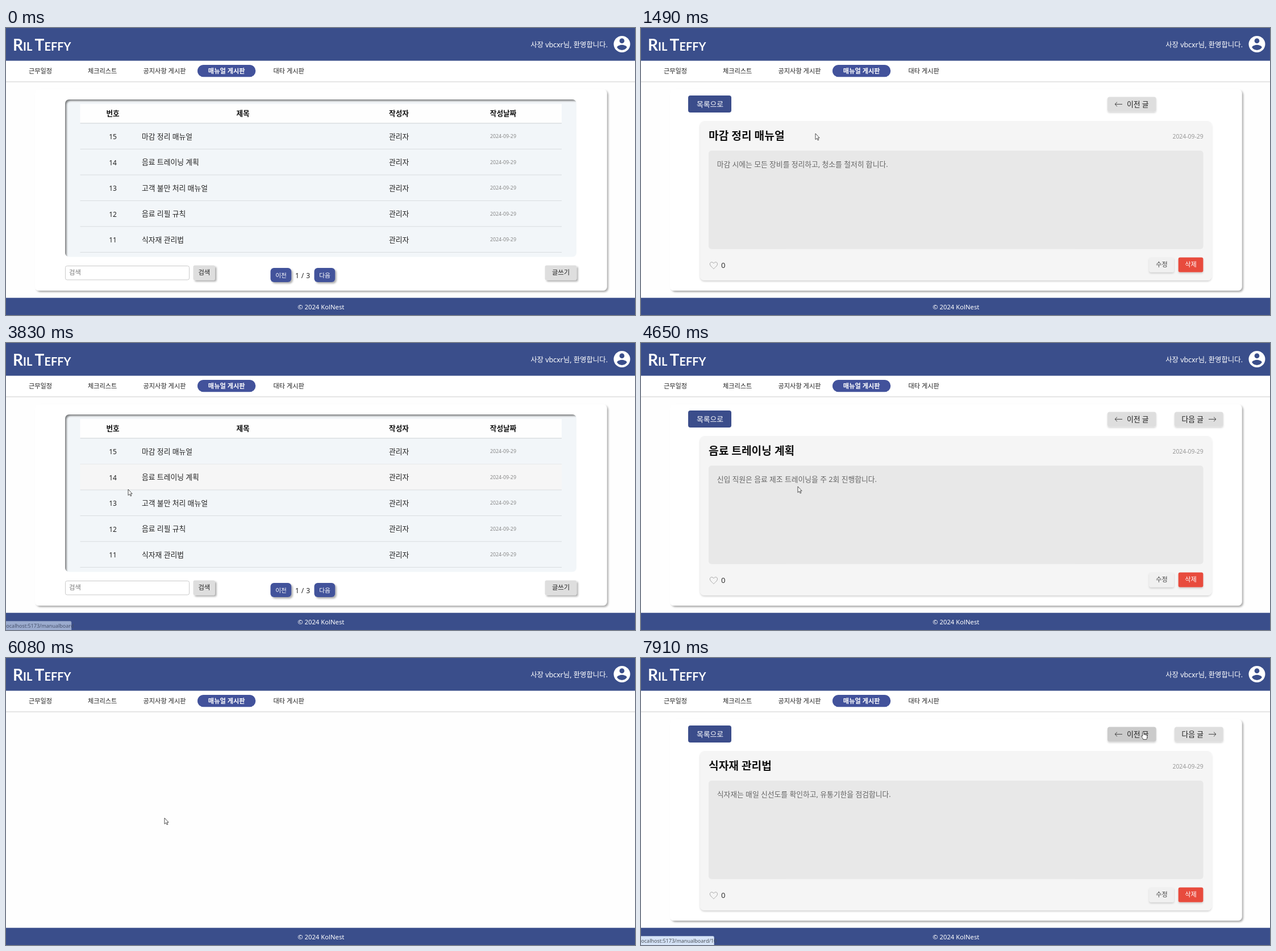
Write an HTML page that moves like this. It is 1107 by 506 pixels and loops after 8000 ms.

```html
<!DOCTYPE html>
<html lang="ko">
<head>
<meta charset="utf-8">
<title>Manual board</title>
<style>
html, body { margin: 0; width: 100%; height: 100%; overflow: hidden; background: #fefefe; }
svg { display: block; width: 1107px; height: 506px; }
text { font-family: "Noto Sans", "Noto Sans CJK KR", "Noto Sans CJK JP", sans-serif; white-space: pre; }
.logo { font-family: Lato, "Open Sans", sans-serif; font-weight: 700; }
</style>
</head>
<body>
<svg id="stage" viewBox="0 0 1107 506" xmlns="http://www.w3.org/2000/svg">
  <defs>
    <filter id="drop" x="-20%" y="-30%" width="150%" height="180%">
      <feDropShadow dx="2.5" dy="2.5" stdDeviation="1.7" flood-opacity=".32"/>
    </filter>
    <filter id="low" x="-20%" y="-30%" width="150%" height="180%">
      <feDropShadow dx="0" dy="2" stdDeviation="1.6" flood-opacity=".17"/>
    </filter>
    <filter id="blur"><feGaussianBlur stdDeviation="1.7"/></filter>
    <clipPath id="panelClip"><rect x="104" y="126" width="900" height="277.5" rx="7"/></clipPath>
  </defs>
  <rect width="1107" height="506" fill="#fefefe"/>
  <g id="frame"></g>
  <g id="page">
    <rect x="51" y="108" width="1006.5" height="355" rx="7" fill="#fff" filter="url(#drop)"/>
    <g id="list"></g>
    <g id="detail"></g>
  </g>
  <g id="status">
    <path id="tab" fill="#d5e3f7" stroke="#b4c4dc" stroke-width=".6"/>
    <text id="url" x="-2" y="501.5" font-size="9" fill="#4a5058"></text>
  </g>
  <circle id="ring" r="8.3" fill="#b5ad18" opacity=".85"/>
  <g id="cursor">
    <path id="arrow" d="M0 0V10.6L2.5 8.4L4.2 12L5.8 11.3L4.2 7.8H7.2Z" fill="#fff" stroke="#222" stroke-width=".8" stroke-linejoin="round"/>
    <path id="hand" d="M-1.2 1.1C-1.2-.4 1.1-.4 1.1 1.1V5.2C1.7 4.4 3 4.6 3.1 5.5C3.8 4.8 5 5.2 5 6C5.8 5.5 6.8 6 6.8 7V9.8C6.8 11.3 6 12 5.8 13.6H-.2C-.6 11.6-2.6 9.8-3.4 8C-3.7 7-2.3 6.6-1.2 8Z" fill="#fff" stroke="#222" stroke-width=".8" stroke-linejoin="round"/>
  </g>
</svg>
<script>
const $ = id => document.getElementById(id);
const LOOP = 8000, NAVY = '#3a4e8b', BLUE = '#42529b', GREY = '#dedede';

const attrs = o => Object.entries(o).map(([k, v]) => ` ${k}="${v}"`).join('');
const box = (x, y, w, h, rx, fill, more = {}) =>
  `<rect${attrs({ x, y, width: w, height: h, rx, fill, ...more })}/>`;
const text = (s, x, y, size, fill, more = {}) =>
  `<text${attrs({ x, y, 'font-size': size, fill, ...more })}>${s}</text>`;
const mid = { 'text-anchor': 'middle' }, end = { 'text-anchor': 'end' };
const bold = { 'font-weight': 700 };
const drop = { filter: 'url(#drop)' }, low = { filter: 'url(#low)' };
const show = (el, on) => el.setAttribute('visibility', on ? 'inherit' : 'hidden');

const posts = {
  15: ['마감 정리 매뉴얼', '마감 시에는 모든 장비를 정리하고, 청소를 철저히 합니다.'],
  14: ['음료 트레이닝 계획', '신입 직원은 음료 제조 트레이닝을 주 2회 진행합니다.'],
  13: ['고객 불만 처리 매뉴얼', '고객 불만이 있을 경우 매니저에게 즉시 보고합니다.'],
  12: ['음료 리필 규칙', '음료 리필은 1회에 한해 무료로 제공합니다.'],
  11: ['식자재 관리법', '식자재는 매일 신선도를 확인하고, 유통기한을 점검합니다.']
};
const DATE = '2024-09-29', ROW = 45.5, TOP = 168;

function buildFrame() {
  const tabs = ['근무일정', '체크리스트', '공지사항 게시판', '매뉴얼 게시판', '대타 게시판'];
  const xs = [60.5, 169.7, 279, 388.2, 497.6];
  $('frame').innerHTML =
    box(0, 94, 1107, 1.2, 0, '#dcdcdc') + box(0, 95.2, 1107, 1.3, 0, '#f3f3f3') +
    box(0, 58, 1107, 36, 0, '#fff') + box(0, 0, 1107, 57.7, 0, NAVY) +
    `<text class="logo" x="12" y="40" fill="#fff" font-size="28">R<tspan font-size="20">IL </tspan>T<tspan font-size="20">EFFY</tspan></text>` +
    text('사장 vbcxr님, 환영합니다.', 1059, 33.5, 12.4, '#fff', { ...end, 'font-weight': 500 }) +
    `<g transform="translate(1066.6 11.1) scale(1.45)"><circle cx="12" cy="12" r="10" fill="#fff"/>
     <circle cx="12" cy="8" r="3" fill="${NAVY}"/>
     <path fill="${NAVY}" d="M12 19.2c-2.5 0-4.71-1.28-6-3.22.03-1.99 4-3.08 6-3.08s5.97 1.09 6 3.08c-1.29 1.94-3.5 3.22-6 3.22z"/></g>` +
    box(337, 65, 102.3, 21.3, 10.6, BLUE) +
    tabs.map((s, i) => text(s, xs[i], 79.6, 11.2, i == 3 ? '#fff' : '#222',
      i == 3 ? { ...mid, ...bold } : mid)).join('') +
    box(0, 475.7, 1107, 30.3, 0, NAVY) +
    text('© 2024 KolNest', 554.3, 496.3, 11.3, '#fff', { ...mid, 'font-weight': 500 });
}

function buildList() {
  const head = [['번호', 188], ['제목', 417], ['작성자', 691.5], ['작성날짜', 875]];
  const rows = [15, 14, 13, 12, 11].map((id, i) => {
    const y = TOP + ROW * i;
    return `<rect id="row${id}" x="130.5" y="${y}" width="847.5" height="${ROW}" fill="#f6f6f6"/>` +
      box(130.5, y + ROW - .5, 847.5, 1, 0, '#d9dde0') +
      text(id, 188, y + 28, 12, '#222', mid) +
      text(posts[id][0], 239, y + 27.7, 12.8, '#222') +
      text('관리자', 674, y + 27.7, 12.8, '#222') +
      text(DATE, 852, y + 26.2, 8.8, '#888');
  }).join('');
  $('list').innerHTML =
    box(104, 126, 900, 277.5, 7, '#f2f6f9') +
    box(130.5, 134, 847.5, 34, 0, '#fefefe') +
    head.map(([s, x]) => text(s, x, 155.4, 12.6, '#111', { ...mid, ...bold })).join('') +
    box(130.5, 167.3, 847.5, 1.2, 0, '#d5d9dc') + rows +
    `<g clip-path="url(#panelClip)"><path filter="url(#blur)" fill="#000" fill-opacity=".48" fill-rule="evenodd"
      d="M90 110H1030V420H90ZM114 128.5Q106.5 128.5 106.5 136V416H1016V128.5Z"/></g>` +
    box(104.5, 419.5, 218, 24.5, 3, '#fff', { stroke: '#cacaca' }) +
    text('검색', 111, 435.3, 11.3, '#777') +
    box(329.5, 418.5, 38.5, 26, 3, GREY, drop) + text('검색', 348.8, 435.4, 11.3, '#222', mid) +
    box(465.5, 423, 36.7, 25, 6, BLUE, drop) + box(542.5, 423, 36.7, 25, 6, BLUE, drop) +
    text('이전', 484, 439.7, 10.7, '#fff', { ...mid, 'font-weight': 500 }) +
    text('다음', 561, 439.7, 10.7, '#fff', { ...mid, 'font-weight': 500 }) +
    text('1 / 3', 522.3, 441, 12, '#222', { ...mid, 'letter-spacing': .4 }) +
    box(948.5, 418.5, 55.7, 26, 3, GREY, drop) + text('글쓰기', 976.5, 435.4, 11.3, '#222', mid);
}

function buildDetail() {
  const arrow = (x, dir) => {
    const tip = dir > 0 ? x + 13 : x, back = tip - dir * 4;
    return `<path d="M${x} 134.4H${x + 13}M${back} 130.6L${tip} 134.4L${back} 138.2" fill="none" stroke="#444"/>`;
  };
  $('detail').innerHTML =
    `<rect id="back" x="83" y="119" width="76" height="30" rx="4"/>` +
    text('목록으로', 121.5, 138.8, 12.8, '#fff', mid) +
    `<rect id="prev" x="821" y="121.5" width="85.7" height="26" rx="4" filter="url(#low)"/>` +
    arrow(834, -1) + text('이전 글', 855, 138.9, 12.8, '#222') +
    `<g id="nextBox"><rect id="next" x="939" y="121.5" width="85.7" height="26" rx="4" filter="url(#low)"/>` +
    text('다음 글', 951.5, 138.9, 12.8, '#222') + arrow(999, 1) + '</g>' +
    box(104, 164, 900.5, 281, 8, '#f5f5f5', low) +
    text('', 119, 197.4, 19.2, '#111', { id: 'title', ...bold }) +
    text(DATE, 989.7, 194.6, 10.4, '#999', end) +
    box(119, 216.3, 870.5, 173.5, 5, '#e8e8e8') +
    text('', 133.7, 244.6, 12.8, '#666', { id: 'body' }) +
    `<path d="M127.9 424.6C124 421 121.3 418.8 121.3 416C121.3 412.2 126 411.7 127.9 415C129.8 411.7 134.5 412.2 134.5 416C134.5 418.8 131.8 421 127.9 424.6Z" fill="none" stroke="#aaa"/>` +
    text('0', 141, 423, 13.2, '#333') +
    box(894.5, 404.5, 43.5, 26, 3, '#f0f0f0', { filter: 'url(#low)' }) + text('수정', 916.5, 421.2, 11.2, '#444', mid) +
    box(945.7, 404.5, 43.7, 26, 3, '#e84c3d', { filter: 'url(#low)' }) + text('삭제', 967.6, 421.2, 11.2, '#fff', mid);
}

// Cursor stops: time, x, y
const path = [
  [460, 730, 492], [560, 420, 330], [650, 196, 225], [800, 307, 186],
  [1940, 307, 186], [2140, 600, 150], [2410, 888, 130],
  [2830, 888, 130], [3150, 111, 130],
  [3470, 111, 130], [3630, 190, 264], [3760, 190, 264], [3830, 215, 258], [4030, 276, 253],
  [4650, 276, 253], [5130, 111, 130],
  [5540, 111, 130], [5860, 279, 282],
  [6150, 279, 282], [6360, 1046, 126], [6560, 1046, 126], [6700, 932, 128],
  [6900, 932, 128], [6970, 900, 130], [7160, 884, 130]
];
function cursorAt(t) {
  let i = path.findLastIndex(p => p[0] <= t);
  if (i < 0) return null;
  const a = path[i], b = path[i + 1];
  if (!b) return [a[1], a[2]];
  let k = (t - a[0]) / (b[0] - a[0]);
  k = k * k * (3 - 2 * k);
  return [a[1] + (b[1] - a[1]) * k, a[2] + (b[2] - a[2]) * k];
}

// Time and shown page: 0 is the list, otherwise a post number
const views = [[0, 0], [1200, 15], [3430, 0], [4240, 14], [5480, 0], [6080, 13], [7300, 12], [7770, 11]];
const clicks = [[940, 1000], [3290, 3400], [4030, 4240], [5340, 5440], [5940, 6030], [7190, 7270], [7700, 7770]];
// Start, end of hold, end of fade, address tail
const hints = [
  [2340, 2960, 2960, '/14'], [3090, 3760, 3950, ''], [5070, 5600, 5800, ''],
  [7040, 7300, 7300, '/12'], [7300, 7770, 7770, '/11'], [7770, 8000, 8000, '/10']
];
const within = (p, x, y, w, h) => !!p && p[0] >= x && p[0] <= x + w && p[1] >= y && p[1] <= y + h;
const clamp = v => Math.max(0, Math.min(1, v));

function pageOpacity(t) {
  if (t >= 1200 && t < 1490) return clamp((t - 1200) / 250);
  if (t >= 6020 && t < 6080) return 1 - (t - 6020) / 60;
  if (t >= 6080 && t < 6360) return clamp((t - 6145) / 190);
  return 1;
}

function draw(t) {
  const p = cursorAt(t), view = views.findLast(v => v[0] <= t)[1];
  show($('list'), !view);
  show($('detail'), view);
  $('page').setAttribute('opacity', pageOpacity(t));

  const onBack = view && within(p, 83, 119, 76, 30);
  const onPrev = view && within(p, 821, 121, 86, 27);
  const onNext = view && view < 15 && within(p, 939, 121, 86, 27);
  if (view) {
    $('title').textContent = posts[view][0];
    $('body').textContent = posts[view][1];
    show($('nextBox'), view < 15);
    $('back').setAttribute('fill', onBack ? '#2b3b6d' : '#3b4d8b');
    $('prev').setAttribute('fill', onPrev ? '#cbcbcb' : GREY);
    $('next').setAttribute('fill', onNext ? '#cbcbcb' : GREY);
  } else {
    for (let id = 15; id > 10; id--)
      show($('row' + id), within(p, 130, TOP + ROW * (15 - id), 848, ROW));
  }

  const hint = hints.find(h => t >= h[0] && t < h[2]);
  show($('status'), hint);
  if (hint) {
    const w = hint[3] ? 128.5 : 115;
    $('tab').setAttribute('d', `M-1 490.5H${w - 2}Q${w} 490.5 ${w} 492.5V507H-1Z`);
    $('url').textContent = 'localhost:5173/manualboard' + hint[3];
    const fade = t < hint[1] ? 1 : 1 - (t - hint[1]) / (hint[2] - hint[1]);
    $('status').setAttribute('opacity', fade);
  }

  const pressed = clicks.some(c => t >= c[0] && t < c[1]);
  const hand = onBack || onPrev || onNext;
  show($('cursor'), p);
  show($('ring'), p && pressed);
  show($('arrow'), !hand);
  show($('hand'), hand);
  if (p) {
    $('cursor').setAttribute('transform', `translate(${p[0]} ${p[1]})`);
    $('ring').setAttribute('cx', p[0] + (hand ? 0 : 3));
    $('ring').setAttribute('cy', p[1] + 1);
  }
}

buildFrame();
buildList();
buildDetail();
const start = performance.now();
function tick() {
  draw((performance.now() - start) % LOOP);
  requestAnimationFrame(tick);
}
tick();
</script>
</body>
</html>
```
